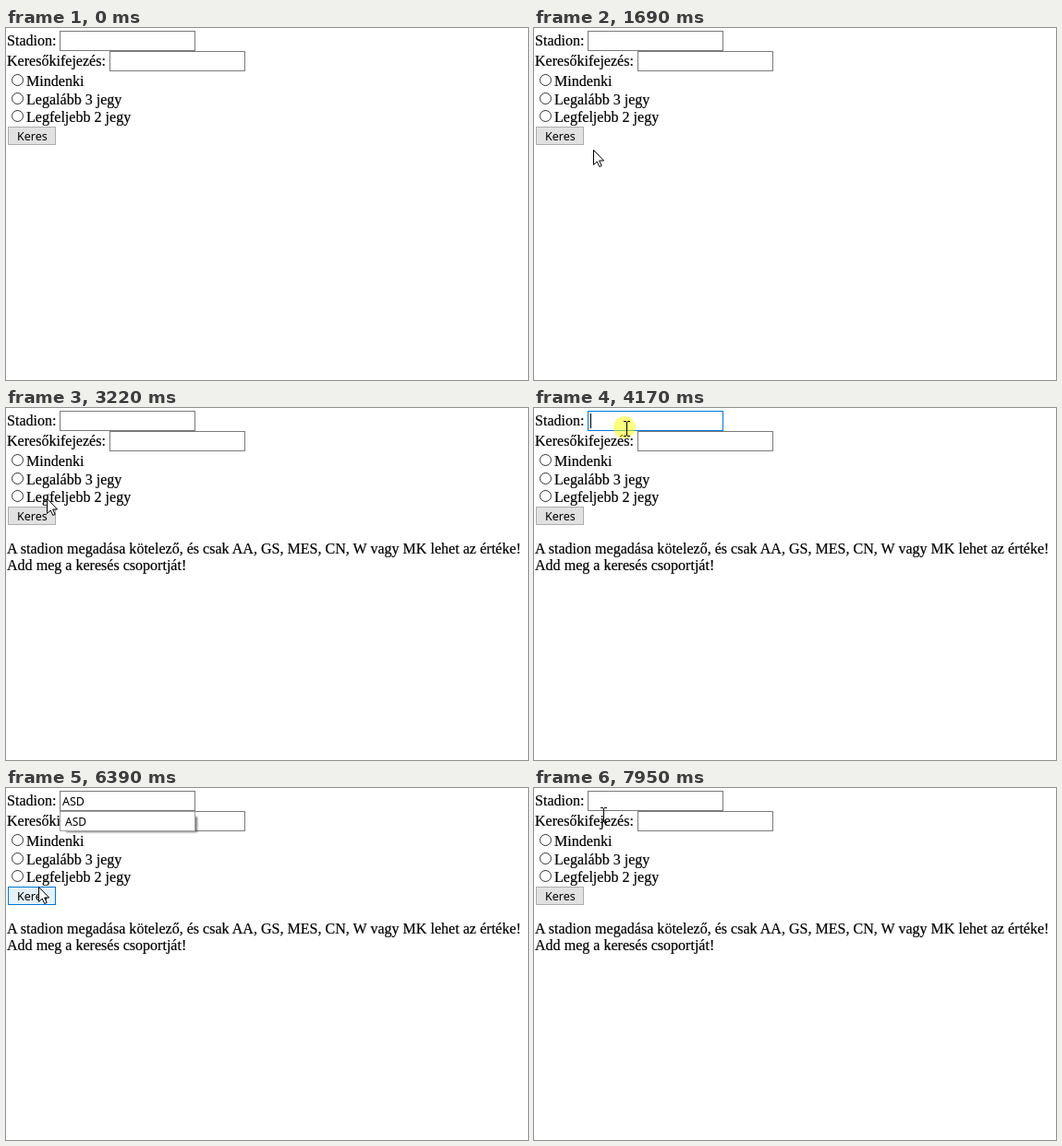
Animation, 565 px wide and 382 px high, one loop 8000 ms. Source, as an HTML page:

```html
<!DOCTYPE html>
<html lang="hu">
<meta charset="utf-8">
<title>Keresés</title>
<style>
  html, body { margin: 0; width: 100%; height: 100%; overflow: hidden; background: #fff; }
  svg { display: block; }
  text { font: 16.06px "Liberation Serif", serif; stroke: #000; stroke-width: .2px; }
  .ui text { font: 12.5px "Noto Sans", sans-serif; stroke: none; }
  #popup text { font-size: 12px; }
  .panel { fill: #fff; stroke: #a0a0a0; }
  .shadow { fill: #0008; filter: blur(1px); }
  .field { fill: #fff; stroke: #7a7a7a; }
  .radio { fill: #fff; stroke: #333; }
</style>
<svg width="565" height="382" viewBox="0 0 565 382">
  <text x="1" y="19">Stadion:</text>
  <text x="1" y="41">Keresőkifejezés:</text>
  <text x="22" y="63">Mindenki</text>
  <text x="22" y="83">Legalább 3 jegy</text>
  <text x="22" y="102">Legfeljebb 2 jegy</text>
  <circle class="radio" cx="12.5" cy="56.5" r="6"/>
  <circle class="radio" cx="12.5" cy="76.5" r="6"/>
  <circle class="radio" cx="12.5" cy="95.5" r="6"/>
  <rect class="field" x="112.5" y="25.5" width="146" height="21"/>
  <g id="errors">
    <text x="1" y="158">A stadion megadása kötelező, és csak AA, GS, MES, CN, W vagy MK lehet az értéke!</text>
    <text x="1" y="176">Add meg a keresés csoportját!</text>
  </g>
  <g class="ui">
    <rect id="button" x="2.5" y="107.5" width="51" height="19"/>
    <text id="label" x="12" y="122">Keres</text>
    <g id="popup">
      <rect id="shadow" class="shadow" x="65" y="31" width="142"/>
      <rect id="panel" class="panel" x="58.5" y="25.5" width="146"/>
      <text x="64" y="41">ASD</text>
      <g id="more"><text x="64" y="62">AA</text><text x="64" y="83">A</text></g>
    </g>
    <rect class="field" id="field" x="58.5" y="3.5" width="146" height="21"/>
    <text id="typed" x="61" y="19"></text>
    <path id="caret" d="M.5 6v16" stroke="#000"/>
  </g>
  <circle id="glow" r="12" fill="#ff0" fill-opacity=".5"/>
  <path id="arrow" d="M.5 .5v16l3.7-3.5 2.6 5.5 2.4-1.1-2.6-5.4h5z" fill="#fff" stroke="#000"/>
  <path id="beam" d="M-3.5-8h3m1 0h3M0-7.5v15M-3.5 8h3m1 0h3" fill="none" stroke="#000" shape-rendering="crispEdges"/>
</svg>
<script>
const LOOP = 8000;
const $ = id => document.getElementById(id);
const show = (id, on) => $(id).style.display = on ? '' : 'none';
const set = (id, attrs) => { for (const k in attrs) $(id).setAttribute(k, attrs[k]); };
const between = (t, a, b) => t >= a && t < b;
const easeOut = power => u => 1 - (1 - u) ** power;
const smooth = u => u * u * (3 - 2 * u);

// Pointer moves in discrete steps, the first at `start`, the last at `end`.
const moves = [
  { start: 380, end: 1150, steps: 11, from: [452, 387], to: [228, 219], ease: u => u },
  { start: 1220, end: 1920, steps: 10, from: [228, 219], to: [32, 115], ease: easeOut(1.5) },
  { start: 3070, end: 3850, steps: 11, from: [32, 115], to: [100, 22], ease: smooth },
  { start: 5930, end: 6560, steps: 9, from: [100, 22], to: [32, 111], ease: easeOut(2) },
  { start: 7640, end: 7950, steps: 5, from: [32, 111], to: [75, 29], ease: u => u }
];

function pointerAt(t) {
  const m = moves.filter(m => t >= m.start).pop();
  if (!m) return null;
  const step = Math.floor((t - m.start) / (m.end - m.start) * (m.steps - 1) + 1.3);
  const u = m.ease(Math.min(1, step / m.steps));
  return m.from.map((a, i) => Math.round(a + (m.to[i] - a) * u));
}

function draw(t) {
  const pointer = pointerAt(t);
  const [x, y] = pointer || [600, 400];
  const popup = between(t, 4780, 6800);
  const overField = between(x, 58, 205) && between(y, 3, 25);
  const overButton = between(x, 2, 54) && between(y, 107, 127);
  const beam = overField || (y < 47 && x < 108 && !popup);

  show('arrow', pointer && !beam);
  show('beam', pointer && beam);
  set('arrow', { transform: `translate(${x} ${y})` });
  set('beam', { transform: `translate(${x + .5} ${y + .5})` });

  const fieldClick = between(t, 4170, 4320);
  show('glow', fieldClick || between(t, 2470, 2610) || between(t, 6800, 6950));
  set('glow', { cx: fieldClick ? x - 2 : x + 1, cy: fieldClick ? y - 1 : y });

  const pressed = between(t, 2470, 2540) || between(t, 6800, 6870);
  const [fill, stroke] = pressed ? ['#cce4f7', '#005499']
    : overButton ? ['#e5f1fb', '#0078d7'] : ['#e1e1e1', '#adadad'];
  set('button', { fill, stroke });
  set('label', { x: pressed ? 13 : 12 });
  $('field').style.stroke = fieldClick ? '#0078d7' : overField ? '#171717' : '#7a7a7a';

  const count = between(t, 4700, 6870) ? 1 + (t >= 4850) + (t >= 5010) : 0;
  $('typed').textContent = 'ASD'.slice(0, count);
  set('caret', { transform: `translate(${61 + 8 * count} 0)` });
  show('caret', between(t, 4170, 5240) || between(t, 5700, 6230));

  const long = t < 4930;
  const height = long ? 63 : 21;
  show('popup', popup);
  show('more', long);
  set('panel', { height });
  set('shadow', { height: height - 4 });
  show('errors', t >= 2540);
}

function tick() {
  draw(performance.now() % LOOP);
  requestAnimationFrame(tick);
}
tick();
</script>
</html>
```
